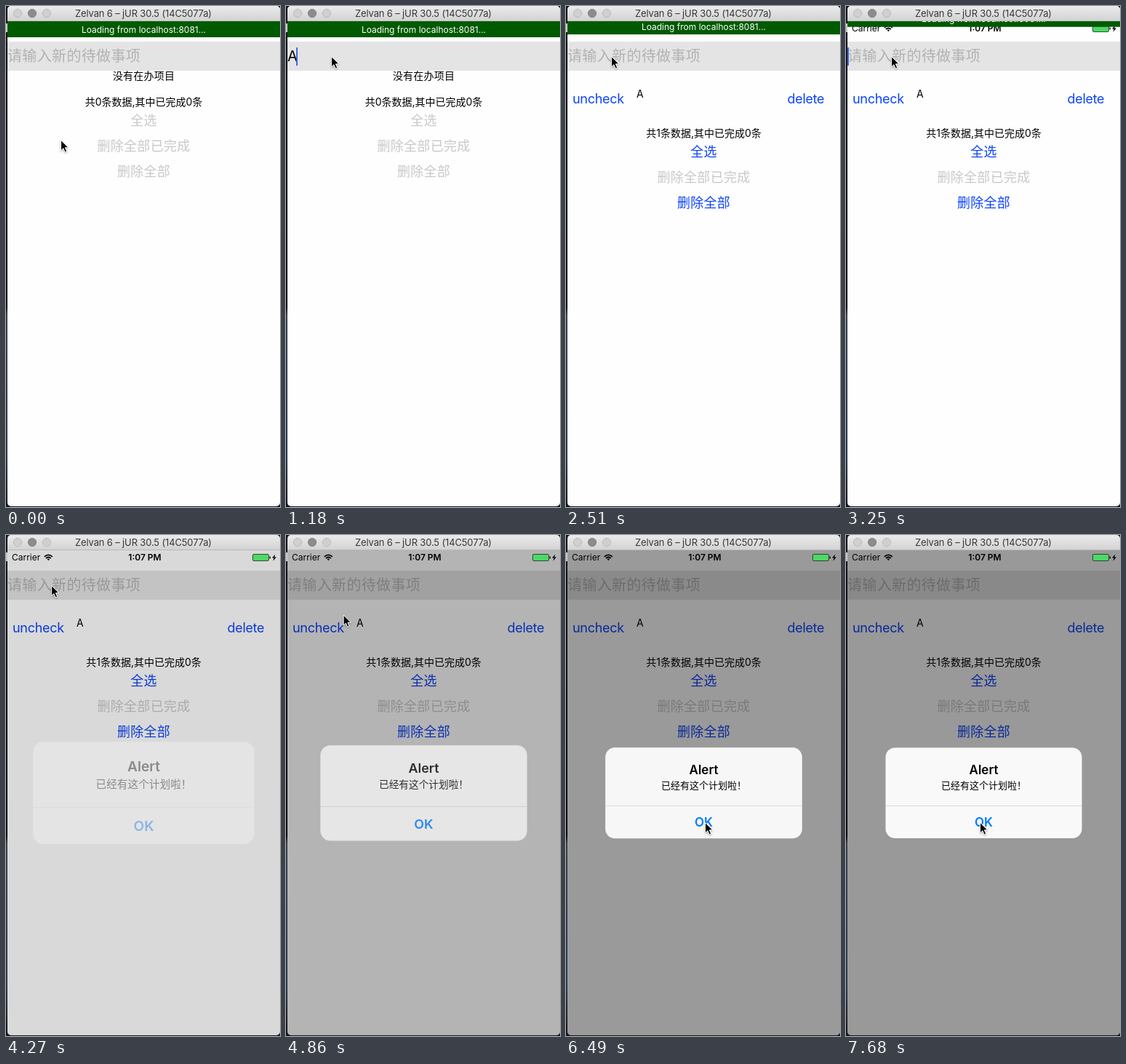
Write an HTML page that moves like this. It is 377 px wide and 689 px high and loops after 8 s.

```html
<!DOCTYPE html>
<html lang="zh">
<meta charset="utf-8">
<title>Todo list</title>
<style>
  html, body { margin: 0; height: 100%; overflow: hidden; background: #14131b; }
  svg { display: block; width: 100vw; height: 100vh; }
  text { font: 14px Inter, "Noto Sans CJK SC", "Noto Sans CJK", sans-serif; white-space: pre; }
  .mid { text-anchor: middle; }
  .button { font-size: 18px; font-weight: 300; letter-spacing: .3px; fill: #c8c8c8; }
  .latin { font-weight: 400; letter-spacing: -.3px; }
  .on { fill: #0c43fb; }
  .field { font-size: 20px; font-weight: 300; letter-spacing: .35px; }
  .small { font-size: 12px; }
  .strong { font-weight: 600; }
  .head { font-size: 17px; }
</style>
<svg viewBox="0 0 377 689">
  <defs>
    <linearGradient id="bar" x2="0" y2="1"><stop stop-color="#ebebeb"/><stop offset="1" stop-color="#d2d2d2"/></linearGradient>
    <linearGradient id="desk" x2="0" y2="1">
      <stop stop-color="#17151d"/><stop offset=".6" stop-color="#0d0c14"/>
      <stop offset=".615" stop-color="#364152"/><stop offset=".9" stop-color="#2b3a50"/><stop offset="1" stop-color="#15151f"/>
    </linearGradient>
    <clipPath id="window"><rect x="2" width="375" height="688" rx="5"/></clipPath>
    <filter id="shadow" x="-50%" y="-50%" width="200%" height="200%">
      <feDropShadow dx="0" dy="1" stdDeviation=".9" flood-opacity=".4"/>
    </filter>
  </defs>
  <rect width="377" height="689" fill="url(#desk)"/>
  <path d="M0 24h2v12h-2z" fill="#c9c9cc"/>

  <g clip-path="url(#window)">
    <rect width="377" height="689" fill="#fefefe"/>
    <rect y="49" width="377" height="40" fill="#e4e4e4"/>
    <text id="hint" class="field" x="2" y="76" fill="#b2b2b5">请输入新的待做事项</text>
    <text id="typed" class="field" x="2" y="76" style="font-weight:400">A</text>
    <rect id="caret" y="57" width="2" height="25" fill="#4468e6"/>

    <text id="empty" class="mid" x="189.5" y="101" letter-spacing=".2">没有在办项目</text>
    <g id="item">
      <text class="button latin on" x="9" y="134">uncheck</text>
      <text x="97" y="126">A</text>
      <text class="button latin on" x="304.5" y="134">delete</text>
    </g>
    <g id="summary" class="mid">
      <text id="count" x="189.5" y="137"></text>
      <text id="all" class="button" x="189.5" y="164">全选</text>
      <text class="button" x="189.5" y="199">删除全部已完成</text>
      <text id="clear" class="button" x="189.5" y="234">删除全部</text>
    </g>
    <rect id="dim" width="377" height="689"/>

    <g id="status">
      <text class="small" x="8" y="35">Carrier</text>
      <g fill="none" stroke="#000" stroke-width="1.7">
        <path d="M52.8 29.8q5.5-5 11 0M54.9 32q3.4-3 6.8 0"/>
        <path d="M56.6 33.3q1.7-1.4 3.4 0l-1.7 1.9z" fill="#000" stroke="none"/>
      </g>
      <text class="small strong mid" x="191" y="35">1:07 PM</text>
      <rect x="339.5" y="26.5" width="22" height="9" rx="1.5" fill="#4cd964" stroke="#222" stroke-width=".8"/>
      <path d="M362.6 29.3q1.5 0 1.5 1.7t-1.5 1.7zM370.5 26.5l-4.5 5h2.6l-1.2 4.2 4.6-5.2h-2.7z"/>
    </g>

    <g id="banner">
      <rect y="21" width="377" height="22" fill="#005a00"/>
      <text class="small mid" x="189.5" y="36.5" fill="#fff">Loading from localhost:8081...</text>
    </g>

    <g id="alert" class="mid">
      <rect x="-135" y="-62.3" width="270" height="124.6" rx="13" fill="#f9f9f9"/>
      <path d="M-135 17.7h270" stroke="#dcdcde"/>
      <text class="head strong" y="-26">Alert</text>
      <text style="font-size:13px" y="-6">已经有这个计划啦！</text>
      <text class="head strong" y="46.5" fill="#007aff">OK</text>
    </g>

    <rect width="377" height="21" fill="url(#bar)"/>
    <path d="M0 20.5h377" stroke="#b9b9b9"/>
    <g fill="#d0d0d0" stroke="#b9b9b9">
      <circle cx="16" cy="10" r="5.6"/>
      <circle cx="36" cy="10" r="5.6" fill="#8c8c8c" stroke="#838383"/>
      <circle cx="56" cy="10" r="5.6"/>
    </g>
    <text class="mid" x="189" y="15" fill="#383838" style="font-size:13px;letter-spacing:-.15px">Zelvan 6 – jUR 30.5 (14C5077a)</text>
  </g>
  <path id="cursor" d="M.6 .5v14.3l3.3-3.1 2.3 5.3 2.5-1.1-2.3-5.1h4.6z" stroke="#fff" stroke-width="1" filter="url(#shadow)"/>
</svg>
<script>
  const LOOP = 8000, STEP = 147.5;
  const $ = id => document.getElementById(id);
  const show = (id, on) => $(id).style.display = on ? '' : 'none';
  const clamp = v => Math.min(1, Math.max(0, v));
  const lerp = (a, b, k) => a + (b - a) * k;

  // Pointer stops: tick, x, y
  const path = [
    [0, 75, 184], [1, 58, 130], [2, 50, 84], [3, 62, 69], [32, 62, 69],
    [34, 95, 150], [35, 128, 233], [36, 165, 325], [37, 186, 385], [38, 191, 395],
    [47, 191, 395], [48, 208, 380], [49, 221, 352], [50, 185, 338], [51, 144, 365], [52, 184, 395]
  ];

  function pointer(tick) {
    const next = path.findIndex(p => p[0] > tick);
    if (next < 0) return path.at(-1).slice(1);
    const [a, b] = [path[next - 1], path[next]];
    const k = (tick - a[0]) / (b[0] - a[0]);
    return [lerp(a[1], b[1], k), lerp(a[2], b[2], k)];
  }

  // cubic-bezier(.42, 0, .58, 1)
  function easeInOut(x) {
    let lo = 0, hi = 1, s = .5;
    for (let i = 0; i < 20; i++) {
      s = (lo + hi) / 2;
      const at = 3 * s * (1 - s) * (.42 * (1 - s) + .58 * s) + s ** 3;
      if (at < x) lo = s; else hi = s;
    }
    return s * s * (3 - 2 * s);
  }

  function draw(ms) {
    let tick = Math.floor((ms + 13) / STEP);
    if (tick === 19) tick = 18; // the screen pauses for one tick
    const t = tick * STEP;

    const added = tick >= 13;
    const typed = tick >= 8 && tick < 13 || tick >= 23 && tick < 26;
    const focused = typed || tick === 7 || tick === 21 || tick === 22;
    show('typed', typed);
    show('hint', !typed);
    show('caret', focused);
    $('caret').setAttribute('x', typed ? 14 : 2);

    show('empty', !added);
    show('item', added);
    $('summary').setAttribute('transform', `translate(0 ${added ? 43 : 0})`);
    $('count').textContent = `共${+added}条数据,其中已完成0条`;
    for (const id of ['all', 'clear']) $(id).classList.toggle('on', added);

    const slide = easeInOut(clamp((t - 1775) / 2500));
    $('banner').setAttribute('transform', `translate(0 ${-22 * slide})`);
    show('status', tick >= 13);

    // Critically damped spring, slowed tenfold
    const w = 2.2855 * Math.max(0, t - 3724) / 1000;
    const rest = (1 + w) * Math.exp(-w);
    $('dim').setAttribute('opacity', .4 * (1 - rest));
    $('alert').setAttribute('opacity', 1 - rest);
    $('alert').setAttribute('transform', `translate(189.5 354.8) scale(${1 + .2 * rest})`);

    $('cursor').setAttribute('transform', `translate(${pointer(tick)})`);
  }

  function frame(now) {
    draw(now % LOOP);
    requestAnimationFrame(frame);
  }
  requestAnimationFrame(frame);
</script>
</html>
```
